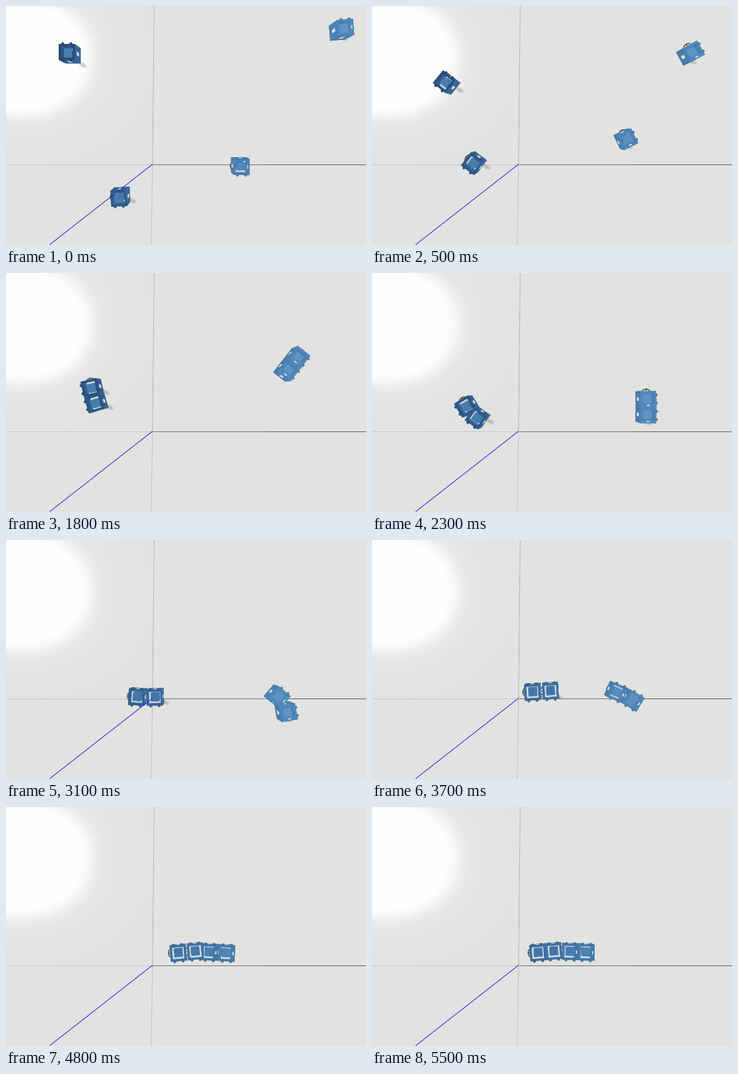
A matplotlib script that plays this animation: 540x359 px, repeating every 5.6 s.

```python
import numpy as np
import matplotlib.pyplot as plt
from matplotlib.animation import FuncAnimation
from matplotlib.collections import PolyCollection

W, H, DPI = 540, 359, 64
PX = 72 / DPI
STEP, FRAMES = 100, 56
EYE = np.array([270.0, 180.0])   # point straight below the camera
LEAN = 0.055                     # perspective gain from base to top
HALF = 11.5                      # half the side of a module
MEET, DOCK = 1000, 1800          # pairs line up, then lock together
PALE = (0.88, 0.89, 0.89)
SIDES = [(1, 0), (0, 1), (-1, 0), (0, -1)]


def smooth(t, a, b):
    s = np.clip((t - a) / (b - a), 0, 1)
    return s * s * (3 - 2 * s)


def glide(t, xs, ys):
    """Monotone cubic through the key values, at rest at both ends."""
    t = np.clip(t, xs[0], xs[-1])
    gap = np.diff(xs)
    rate = np.diff(ys) / gap
    prod = rate[:-1] * rate[1:]
    mean = 2 * prod / np.where(prod > 0, rate[:-1] + rate[1:], 1)
    slope = np.r_[0, np.where(prod > 0, mean, 0), 0]
    i = min(np.searchsorted(xs, t, side="right") - 1, len(gap) - 1)
    s = (t - xs[i]) / gap[i]
    ease = s * s * (3 - 2 * s)
    return (ys[i] * (1 - ease) + ys[i + 1] * ease
            + gap[i] * (slope[i] * s * (1 - s) ** 2 - slope[i + 1] * s * s * (1 - s)))


class Pair:
    """Two modules that meet, dock and then drive as one hinged body."""

    def __init__(self, starts, stops, reach, bend, bend_time):
        self.starts = np.array(starts, float)      # x, y, heading of each module
        self.stops = np.array(stops, float).T      # time, x, y, axis of the pair
        self.reach, self.bend, self.bend_time = reach, bend, bend_time

    def joined(self, t):
        x, y, axis = (glide(t, self.stops[0], row) for row in self.stops[1:])
        gap = (23.5 + (self.reach - 23.5) * (1 - smooth(t, MEET, DOCK))
               + 3 * (smooth(t, 2300, 3100) - smooth(t, 4300, 5400)))
        bend = self.bend * np.exp(-((t - self.bend_time) / 480) ** 2)
        a = np.radians(axis)
        off = gap / 2 * np.array([np.cos(a), np.sin(a)])
        return np.array([(x + k * off[0], y + k * off[1], axis + k * bend) for k in (1, -1)])

    def poses(self, t):
        s = min(t / MEET, 1)
        return self.starts * (1 - s) + self.joined(max(t, MEET)) * s


LEFT = Pair([(96, 72, 180), (172, 286, 177)],
            [(MEET, 132, 172, 257), (DOCK, 133, 184, 255), (2300, 151, 208.5, 227),
             (3100, 211, 235, 181), (4300, 279, 218, 175), (5400, 261, 217, 175)],
            26.5, 14, 2500)
RIGHT = Pair([(503, 36, 175), (351, 240, 180)],
             [(MEET, 430.5, 133, 308), (DOCK, 428, 137, 308), (2300, 410.5, 201, 270),
              (3100, 413, 246, 240), (4300, 332, 220, 185), (5400, 308.5, 217, 182)],
             68, -20, 3100)


def tint(x, left, mid, right):
    return np.array([np.interp(x, [90, 270, 400], c) for c in zip(left, mid, right)]) / 255


class Module:
    def __init__(self, pose, plate):
        x, y, heading = pose
        self.pos = np.array([x, y])
        a = np.radians(heading)
        self.rot = np.array([[np.cos(a), -np.sin(a)], [np.sin(a), np.cos(a)]])
        self.plate = plate
        self.frame = tint(x, (34, 74, 118), (62, 112, 162), (82, 136, 184))
        self.wall = tint(x, (56, 100, 146), (62, 114, 166), (76, 130, 178))
        self.inner = tint(x, (44, 84, 128), (84, 130, 176), (74, 128, 177))
        self.block = tint(x, (74, 126, 174), (64, 118, 172), (94, 148, 198))
        self.floor = tint(np.clip(x, 355, 395) * 3.25 - 883.75,
                          (218, 222, 225), (218, 222, 225), (82, 137, 186))

    def put(self, pts, h):
        p = self.pos + np.asarray(pts, float) @ self.rot.T
        return EYE + (p - EYE) * (1 + LEAN * (np.asarray(h, float).reshape(-1, 1) - 0.5))

    def box(self, r, h, u=0, r2=None):
        r2 = r if r2 is None else r2
        return self.put([(u - r, -r2), (u + r, -r2), (u + r, r2), (u - r, r2)], h)

    def disc(self, u, v, r, h):
        a = np.linspace(0, 2 * np.pi, 12, endpoint=False)
        return self.put(np.c_[u + r * np.cos(a), v + r * np.sin(a)], h)

    def shadow(self):
        x, y = self.pos
        dx = np.interp(x, [150, 400], [19, 3])
        dy = np.interp(x, [150, 400], [np.interp(y, [70, 150], [17, 6]), 12])
        a = np.linspace(0, 2 * np.pi, 20)
        for r in (7, 5, 3):
            ring = np.c_[x + dx + r * np.cos(a), y + dy + r * (0.6 * np.sin(a) + 0.4 * np.cos(a))]
            yield ring, (0.45, 0.4, 0.4, 0.12)

    def wheel(self):
        v = np.linspace(-6, 6, 9)
        u = 15.5 - v ** 2 / 16
        dark = (0.32, 0.34, 0.36, 1)
        yield self.put(np.r_[np.c_[u, v], np.c_[u - 1.3, v][::-1]], 0.6), dark
        yield self.box(2, 0.6, u=13, r2=0.7), dark

    def side(self, n, w, h0, h1):
        """Panel of half width w on the upright side n quarter turns from the front."""
        c, s = SIDES[n]
        ends = [(HALF * c - k * s, HALF * s + k * c) for k in (-w, w)]
        return self.put(ends + ends[::-1], [h0, h0, h1, h1])

    def body(self):
        faces_eye = [(self.rot @ np.array(d)) @ (EYE - self.pos) > 0 for d in SIDES]
        yield self.box(HALF, 0), self.floor
        for n in range(4):
            if not faces_eye[n]:
                yield self.side(n, HALF, 0, 1), self.inner
        yield self.box(6, 0.3), self.block * 0.85
        yield self.box(6.2, 0.8), self.block
        for n in range(4):
            if faces_eye[n]:
                yield self.side(n, HALF, 0, 1), self.wall * (1 - 0.05 * (n % 2))
                yield self.side(n, 2.4, 0.3, 0.65), PALE
        rim, hole = self.box(HALF, 1), self.box(HALF - 2.9, 1)
        for i in range(4):
            j = (i + 1) % 4
            yield np.array([rim[i], rim[j], hole[j], hole[i]]), self.frame
        if self.plate:
            yield self.box(3, 1, u=-HALF + 3, r2=HALF), self.frame
            yield self.box(0.7, 1, u=-HALF + 2.5, r2=2.2), PALE
        for u in (-6, 6):
            for v in (-HALF - 0.6, HALF + 0.6):
                yield self.disc(u, v, 1.9, 1), self.frame * 0.95


def backdrop():
    y, x = np.mgrid[0:H, 0:W] + 0.5
    d = (np.abs((x - 20) / 107) ** 2.15 + np.abs((y - 77) / 88) ** 2.15) ** (1 / 2.15)
    core = 1 / (1 + np.exp((d - 1) / 0.055))
    halo = 0.3 * np.exp(-np.clip(d - 1, 0, None) / 0.4)
    glow = (core + halo * (1 - core))[..., None]
    base = np.array([226, 227, 224]) / 255
    return base + (1 - base) * glow


fig = plt.figure(figsize=(W / DPI, H / DPI), dpi=DPI)
ax = fig.add_axes([0, 0, 1, 1])
ax.axis("off")
ax.imshow(backdrop(), extent=(0, W, H, 0), interpolation="nearest", aspect="auto")
ax.set_xlim(0, W)
ax.set_ylim(H, 0)


def line(x0, y0, x1, y1, color, z=2):
    ax.plot([x0, x1], [y0, y1], color=color, lw=PX, zorder=z, solid_capstyle="butt")


line(0, 237.5, 220, 237.5, "#c6c6c4")
line(220, 237.5, 390, 237.5, "#747474")
line(390, 237.5, 540, 237.5, "#606060")
line(222.3, 0, 219.8, 238, "#b4b4b2")
line(219.8, 238, 217.8, 359, "#c2c2c0")
line(220, 237.5, 65.5, 358.5, "#2a1ee0", 5)

parts = PolyCollection([], linewidths=0.4, zorder=3)
ax.add_collection(parts, autolim=False)


def draw(i):
    t = i * STEP
    mods = [Module(p, pair is RIGHT) for pair in (LEFT, RIGHT) for p in pair.poses(t)]
    mods.sort(key=lambda m: -np.hypot(*(m.pos - EYE)))
    layers = (Module.shadow, Module.wheel, Module.body)
    shapes = [s for layer in layers for m in mods for s in layer(m)]
    colors = [tuple(c) if len(c) == 4 else (*c, 1) for _, c in shapes]
    parts.set_verts([p for p, _ in shapes])
    parts.set_facecolor(colors)
    parts.set_edgecolor([c if c[3] == 1 else (0, 0, 0, 0) for c in colors])
    return [parts]


anim = FuncAnimation(fig, draw, frames=FRAMES, interval=STEP, repeat=True,
                     repeat_delay=0, init_func=lambda: draw(0))
plt.show()
```
